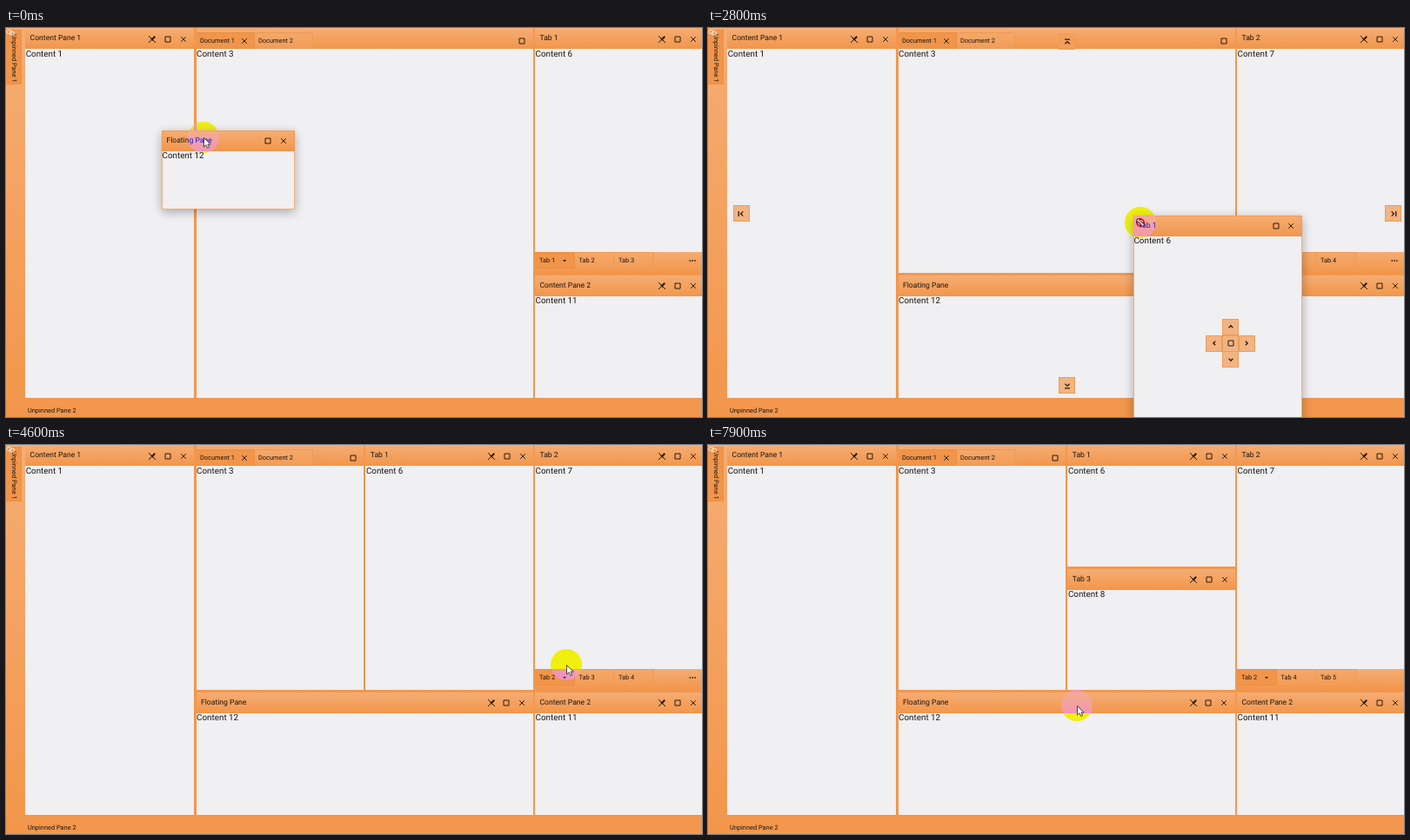
An HTML page for the animation above (8000 ms loop, 800 by 448 pixels).

```html
<!DOCTYPE html>
<html lang="en">
<head>
<meta charset="utf-8">
<title>Dock manager</title>
<style>
  html, body { margin: 0; width: 100%; height: 100%; overflow: hidden; }
  #stage {
    position: relative; width: 800px; height: 448px; overflow: hidden; isolation: isolate;
    background: #f2974d; color: #1c1611;
    font: 7.4px/10px Roboto, sans-serif; text-rendering: geometricPrecision;
  }
  #stage div, #stage svg { position: absolute; box-sizing: border-box; white-space: nowrap; }
  svg { width: 1px; height: 1px; overflow: visible; fill: none; stroke: #2a1b10; }
  .bar { background: linear-gradient(#f5ad74, #f2964b); }
  .title { font-size: 8.6px; }
  .body { background: #f0eff1; font-size: 9.84px; line-height: 11.6px; padding: .4px 0 0 .5px; }
  .tab { background: linear-gradient(#f4a869, #f39d58); border: solid #ee9a58; border-width: .5px 1px .5px 0; }
  .tab.active { background: #f0954a; border-color: #ec8f42; }
  .float { box-shadow: 0 3px 11px rgba(0, 0, 0, .3); }
  .float::after { content: ""; position: absolute; inset: 0; border: 1px solid rgba(240, 152, 78, .7); }
  .cell { width: 19px; height: 19px; background: rgba(243, 160, 92, .74); border: 1px solid #ef9c57; }
  .preview { background: rgba(128, 170, 240, .26); }
  .side { transform: rotate(90deg); transform-origin: 0 0; }
  .halo { border-radius: 50%; background: #00f; }
  .invert { mix-blend-mode: difference; }
</style>
</head>
<body>
<div id="stage"></div>
<script>
const LOOP = 8000, TICK = 100, LAG = 30;

// Layout grid
const BAR = 24.3, GAP = 2.4;
const LEFT = 22.2, DOC = 218.6, MID = 413.4, RIGHT = 608.1;
const BOTTOM = 426.3, SPLIT = 282.4, LOW = SPLIT + GAP, HALF = 140.2;
const COL = 194, WIDE = RIGHT - GAP - DOC, NARROW = MID - GAP - DOC + .4;
const CENTER = 412.5, TARGET_Y = 141.5;

// Times of pulling panes out and dropping them
const PULL0 = 400, DROP0 = 1600, PULL1 = 2400, DROP1 = 4200, PULL2 = 5000, DROP2 = 6400;

const stage = document.getElementById('stage');
const timed = [], moving = [];

const ICONS = {
  max: '<path d="M-3-3H3V3H-3Z"/>',
  close: '<path d="M-2.8-2.8L2.8 2.8M2.8-2.8L-2.8 2.8"/>',
  pin: '<path d="M-4-4L4 4M-4 4L-1 1"/><path d="M-2-.5L0-1.5 2.5-4 4-2.5 1.5 0 .5 2Z" fill="#2a1b10" stroke="none"/>',
  arrow: '<path d="M-2.3 1.2L0-1.2 2.3 1.2" stroke-width="1.3"/>',
  edge: '<path d="M-2.8-3V3M2.3-2.6L-.4 0 2.3 2.6" stroke-width="1.3"/>',
  half: '<path d="M-4 0H4V3.5H-4Z"/><path d="M-4 0V-3.5H4V0" stroke-dasharray="1.4 .9"/>',
  columns: '<path d="M-1.5-3.5H-3.7V3.5H-1.5M1.5-3.5H3.7V3.5H1.5M0-4.5V4.5"/>',
  caret: '<path d="M-2-1H2L0 1.2Z" fill="#2a1b10" stroke="none"/>',
  dots: '<path d="M-3.5 0H4" stroke-width="1.6" stroke-dasharray="1.6 1.2"/>',
  link: '<g stroke="#fbe9da"><ellipse cx="-1.5" cy="-.5" rx="3" ry="2"/><ellipse cx="2" cy="1" rx="3" ry="2"/></g>',
  ring: '<circle r="4" stroke="#e8112d" stroke-width="2"/>',
  pointer: '<path d="M.5.5V11L3 8.7 4.8 12.4 6.6 11.6 4.9 8H8.2Z" fill="#fff" stroke="#222" stroke-width=".8"/>',
  resize: '<path d="M-4-4H0L-1.3-2.7 2.7 1.3 4 0V4H0L1.3 2.7-2.7-1.3-4 0Z" fill="#fff" stroke="#111" stroke-width=".9"/>'
};

function box(parent, cls, x, y, w, h, text = '') {
  const el = document.createElement('div');
  el.className = cls;
  el.style.left = x + 'px';
  el.style.top = y + 'px';
  if (w) el.style.width = w + 'px';
  if (h) el.style.height = h + 'px';
  el.textContent = text;
  parent.append(el);
  return el;
}

function icon(parent, name, x, y, turn = 0) {
  parent.insertAdjacentHTML('beforeend',
    `<svg style="left:${x}px;top:${y}px"><g transform="rotate(${turn})">${ICONS[name]}</g></svg>`);
  return parent.lastElementChild;
}

const label = (parent, x, y, text, cls = '') => box(parent, cls, x, y, 0, 0, text);
const group = (cls = '') => box(stage, cls, 0, 0);
const show = (el, ...spans) => (timed.push({ el, spans }), el);
const follow = (el, dx = 0, dy = 0, lag = 0) => (moving.push({ el, dx, dy, lag }), el);

function frame(x, y, w, h, body, cls = '') {
  const el = box(stage, cls, x, y, w, h);
  box(el, 'bar', 0, 0, w, BAR);
  box(el, 'body', 0, BAR, w, h - BAR, body);
  return el;
}

function pane(x, y, w, h, title, body, floating = false) {
  const el = frame(x, y, w, h, body, floating ? 'float' : '');
  label(el, 5.4, 7.3, title, 'title');
  const tools = floating ? ['close', 'max'] : ['close', 'max', 'pin'];
  tools.forEach((name, i) => icon(el, name, w - 12.5 - i * 17.8, 12.6));
  return el;
}

const floater = (w, h, title, body) => pane(0, 0, w, h, title, body, true);

function docPane(w, h) {
  const el = frame(DOC, 0, w, h, 'Content 3');
  for (const i of [0, 1]) {
    box(el, i ? 'tab' : 'tab active', i * 67.5, 5, 67, BAR - 5);
    label(el, 4.4 + i * 67, 10, `Document ${i + 1}`);
  }
  icon(el, 'close', 55.4, 15);
  icon(el, 'max', w - 12.6, 15);
  return el;
}

function tabGroup(body, tabs) {
  const top = SPLIT - BAR;
  const el = pane(RIGHT, 0, COL, top, tabs[0], body);
  box(el, 'bar', 0, top, COL, BAR);
  tabs.slice(0, 3).forEach((name, i) => {
    box(el, i ? 'tab' : 'tab active', i * 45.5, top, 45.5, 18.8);
    label(el, 4.9 + i * 45.5, top + 5, name);
  });
  icon(el, 'caret', 34.2, top + 9.8);
  if (tabs.length > 3) icon(el, 'dots', 181.4, top + 9.8);
  return el;
}

function cell(parent, x, y, name, turn) {
  icon(box(parent, 'cell', x - 9.5, y - 9.5), name, 8.5, 8.5, turn);
}

function compass(x, y, full) {
  const el = group();
  for (let i = 0; i < 4; i++) {
    const turn = i * 90, dx = [0, 1, 0, -1][i], dy = [-1, 0, 1, 0][i];
    const split = dx ? 'columns' : 'half';
    cell(el, x + dx * 18.8, y + dy * 18.8, full ? split : 'arrow', full && dx ? 0 : turn);
    if (full) cell(el, x + dx * 44.6, y + dy * 44.6, 'arrow', turn);
  }
  cell(el, x, y, 'max', 0);
  return el;
}

// Fixed frame
box(stage, 'bar', 0, 0, LEFT, 448);
box(stage, 'tab active', 0, 2, 18, 63);
label(stage, 14, 7, 'Unpinned Pane 1', 'side');
label(stage, 25, 435.5, 'Unpinned Pane 2');
icon(stage, 'link', 5, 5);

// Docked panes
const lowHeight = BOTTOM - LOW;
const tabNames = n => Array.from({ length: 6 - n }, (_, i) => `Tab ${n + i}`);
pane(LEFT, 0, COL, BOTTOM, 'Content Pane 1', 'Content 1');
pane(RIGHT, LOW, COL, lowHeight, 'Content Pane 2', 'Content 11');
show(docPane(WIDE, BOTTOM), [0, DROP0]);
show(docPane(WIDE, SPLIT), [DROP0, DROP1]);
show(docPane(NARROW, SPLIT), [DROP1, LOOP]);
show(pane(DOC, LOW, WIDE, lowHeight, 'Floating Pane', 'Content 12'), [DROP0, LOOP]);
show(tabGroup('Content 6', tabNames(1)), [0, PULL1]);
show(tabGroup('Content 7', tabNames(2)), [PULL1, PULL2]);
show(tabGroup('Content 7', tabNames(2).filter(n => n !== 'Tab 3')), [PULL2, LOOP]);
show(pane(MID, 0, NARROW, SPLIT, 'Tab 1', 'Content 6'), [DROP1, DROP2]);
show(pane(MID, 0, NARROW, HALF, 'Tab 1', 'Content 6'), [DROP2, LOOP]);
show(pane(MID, HALF + GAP, NARROW, SPLIT - HALF - GAP, 'Tab 3', 'Content 8'), [DROP2, LOOP]);

// Docking targets and dragged panes
show(compass(CENTER, 213.5, true), [PULL0, DROP0]);
show(compass(CENTER, TARGET_Y, true), [2900, DROP1]);
show(compass(510, TARGET_Y, false), [5200, DROP2]);

follow(show(floater(152.5, 91, 'Floating Pane', 'Content 12'), [0, DROP0]), -48, -8.5, LAG);
follow(show(floater(COL, 282, 'Tab 1', 'Content 6'), [PULL1, DROP1]), -15, -11, LAG);
follow(show(floater(COL, 282, 'Tab 3', 'Content 8'), [PULL2, DROP2]), -3, -8, LAG);

show(compass(600.5, 363, false), [2500, 2900]);
show(box(stage, 'preview', DOC, 284, WIDE, BOTTOM - 284), [1200, DROP0]);
show(box(stage, 'preview', MID, 0, NARROW, SPLIT), [3700, DROP1]);
show(box(stage, 'preview', MID, HALF + GAP / 2, NARROW, HALF), [6000, DROP2]);

const edges = show(group(), [PULL0, DROP0], [PULL1, DROP1], [PULL2, DROP2]);
cell(edges, 38, 213.5, 'edge', 0);
cell(edges, CENTER, 15.5, 'edge', 90);
cell(edges, 787.5, 213.5, 'edge', 180);
cell(edges, CENTER, 411.5, 'edge', 270);

// Pointer with its highlight
box(follow(group('invert')), 'halo', -18, -18, 36, 36);
const pointer = follow(group());
show(icon(pointer, 'ring', 0, 0), [PULL0, DROP0], [2200, DROP1], [4800, DROP2]);
show(icon(pointer, 'pointer', 0, 0), [0, 2600], [3000, LOOP]);
show(icon(pointer, 'resize', 0, 0), [2600, 3000]);

// Each glide: begin, end, x, y; the pointer rests in between
const HOME = { x: 227, y: 126 };
const glides = [
  [PULL0, 1200, 419, 260],
  [DROP0, 2200, 624, 267],
  [PULL1, 3400, 425, 200],
  [3400, 3900, 451, 140],
  [DROP1, 4800, 668, 267],
  [4900, 5400, 531, 248],
  [5400, 6200, 503, 167],
  [DROP2, 6900, 612, 288],
  [7300, 7900, 424, 300]
];

function pointerAt(t) {
  let { x, y } = HOME;
  for (const [begin, end, toX, toY] of glides) {
    const k = Math.min(1, Math.max(0, (t - begin) / (end - begin)));
    const eased = 1 - (1 - k) ** 2;
    x += (toX - x) * eased;
    y += (toY - y) * eased;
  }
  return { x, y };
}

function draw(now) {
  const t = Math.floor((now % LOOP) / TICK) * TICK;
  for (const { el, spans } of timed)
    el.style.display = spans.some(([a, b]) => t >= a && t < b) ? '' : 'none';
  for (const { el, dx, dy, lag } of moving) {
    const { x, y } = pointerAt(t - lag);
    el.style.left = x + dx + 'px';
    el.style.top = y + dy + 'px';
  }
}

const start = performance.now();
function loop() {
  draw(performance.now() - start);
  requestAnimationFrame(loop);
}
loop();
</script>
</body>
</html>
```
